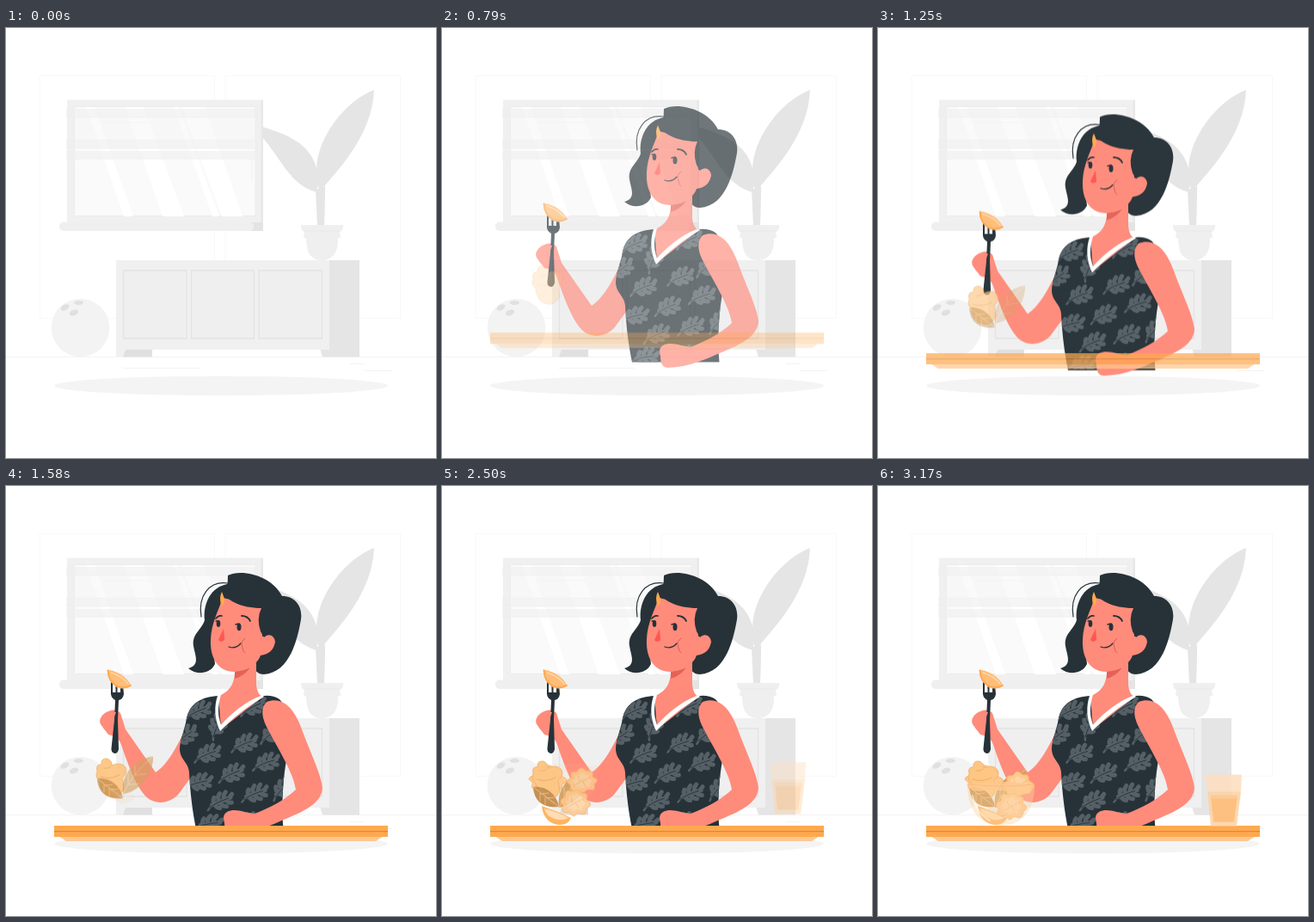
Animation, 500 px wide and 500 px high, one loop 3.21 s. Source, as an HTML page:

```html
<!DOCTYPE html>
<html lang="en">
<head>
<meta charset="utf-8">
<title>Healthy lunch</title>
<style>
html, body { margin: 0; width: 100%; height: 100%; overflow: hidden; background: #fff; }
svg { display: block; width: 100vw; height: 100vh; }
.slide { opacity: 0; }
.line { fill: none; stroke-linecap: round; stroke-linejoin: round; }
.dark { fill: #263238; }
.skin { fill: #ff8b7b; }
</style>
</head>
<body>
<svg viewBox="0 0 500 500">
  <defs>
    <clipPath id="dressClip"><use href="#dress"/></clipPath>
    <clipPath id="pane"><rect x="80" y="92" width="210" height="127"/></clipPath>
    <g id="print" class="line" stroke="#555f66">
      <path stroke-width="5" d="M-10 0H13M-7 0Q-8 -4 -5 -7M-7 0Q-7 5 -3 7M-1 0Q-2 -6 3 -9M-1 0Q0 6 5 8M5 0Q5 -5 10 -8M6 0Q8 5 12 6M11 0L16 -3"/>
      <path stroke-width="2.400" d="M-17 4Q-13 1 -8 0"/>
      <path stroke="#263238" stroke-width=".8" d="M-14 2Q-4 -1 10 0"/>
    </g>
  </defs>

  <g id="room">
    <g class="line" stroke="#f8f8f8">
      <path d="M39.500 55.500H242.500V337.500H39.500ZM255.500 55.500H458.500V337.500H255.500Z"/>
      <path stroke="#f3f3f3" d="M0 382.500H500M136 395.500H224M400 390.500H416M417 398.500H448"/>
    </g>
    <ellipse cx="250" cy="416" rx="194" ry="11.300" fill="#f4f4f4"/>

    <path fill="#f0f0f0" d="M71 83.500H299V236H71Z"/>
    <path fill="#e8e8e8" d="M296.500 84H299V236H285V226H296.500Z"/>
    <path fill="#e4e4e4" d="M286 226H299V236H286Z"/>
    <path fill="#fafafa" stroke="#ececec" d="M79.500 91.500H290V218.500H79.500Z"/>
    <g clip-path="url(#pane)" fill="#fff">
      <path d="M93 92H103L148 219H137ZM138 92H160L207 219H182ZM195 92H201L248 219H240ZM204 92H231L275 219H251Z"/>
    </g>
    <g fill="#f0f0f0" fill-opacity=".65">
      <path d="M70 94H293V104H70ZM70 130H293V140H70ZM70 143H293V153H70Z"/>
      <path fill-opacity=".35" d="M80 104H290V129H80Z"/>
    </g>
    <path class="line" stroke="#ededed" stroke-width=".6" d="M70 104H293M70 130H293M70 140H293M114 110H167M286 152V177"/>
    <rect x="62" y="225.500" width="226" height="10.500" rx="5" fill="#efefef"/>

    <g fill="#e5e5e5">
      <path d="M360 188Q361 210 362 230H370Q371 205 371 184Z"/>
      <path d="M298 115C325 123 354 134 361 163C363 174 363 184 361 191C330 182 320 152 298 127Z"/>
      <path d="M428 72C394 85 361 128 361 166Q360 180 365 190C386 165 426 125 428 72Z"/>
    </g>
    <path fill="#efefef" d="M343 229H392V233Q391 236 388 237L389 244H386C387 260 380 270 367 270S349 260 349 244H346L347 237Q343 236 343 229Z"/>
    <path class="line" stroke="#e6e6e6" stroke-width=".8" d="M347 236H388"/>

    <path fill="#f0f0f0" d="M128 270H376V382H368L365 374H170V382H128Z"/>
    <path fill="#e5e5e5" d="M376 270H411V382.500H368L366 374H376Z"/>
    <path fill="#e0e0e0" d="M139 374H170V382.500H136Z"/>
    <path fill="#efefef" stroke="#e3e3e3" stroke-width="1.300" d="M136.500 282H210V361H136.500ZM215.500 282H288.500V361H215.500ZM294 282H367.500V361H294Z"/>

    <circle cx="86.500" cy="348.500" r="33.800" fill="#f3f3f3"/>
    <g fill="#e0e0e0">
      <ellipse cx="68.500" cy="325" rx="5.300" ry="3.200" transform="rotate(-30 68.500 325)"/>
      <ellipse cx="84.500" cy="319.500" rx="5.500" ry="2.600"/>
      <ellipse cx="79" cy="331" rx="5.400" ry="3.200" transform="rotate(-22 79 331)"/>
    </g>
  </g>

  <g id="woman" class="slide">
    <path class="dark" d="M258 104C274 96 309 104 321 128C337 128 345 141 343 155C339 178 330 217 300 219Q289 219 286 205L257 130Z"/>
    <path class="dark" d="M258 114C238 117 229 137 231 156C227 168 216 172 218 186C220 198 226 208 212 212C222 221 238 218 243 207L241 190L247 150L264 130Z"/>
    <path class="line" stroke="#263238" stroke-width="1.200" d="M227 152C223 128 236 110 258 113"/>

    <path class="skin" d="M210 279C200 302 187 325 174 333L139 283L133 264Q126 257 115 264Q107 270 110 277L119 289Q129 291 133 298C141 322 150 346 160 358C171 372 189 370 200 359L217 336Z"/>
    <path class="skin" d="M266 208C267 229 262 238 246 245L250 284L298 245Q292 242 291 231V202Z"/>
    <path fill="#e56158" d="M266 215Q275 216 284 211Q277 221 266 224Z"/>
    <path id="dress" class="dark" d="M247 244C228 245 214 252 210 270C208 284 202 294 202 307C203 319 212 321 213 333C214 355 217 380 221 398.500H322.500C320 372 322 345 325 325C330 305 329 257 318 248Q310 243 300 244L250 283Z"/>
    <g id="prints" clip-path="url(#dressClip)"></g>
    <path fill="#fff" d="M246 244L250 243C246 256 246 267 250 278C262 264 278 251 296 244L300 245C281 256 264 269 249 285C242 270 242 256 246 244Z"/>

    <path class="skin" d="M252 130C247 145 239 159 238 178C237 198 245 216 266 216C281 214 292 208 296 197Q311 195 313 181Q311 171 302 174L298 175L297 140Z"/>
    <path class="dark" d="M250 119C254 133 274 142 297 142Q291 154 296 169L300 176Q308 169 313 175L322 145L305 115L270 105Z"/>
    <path fill="#ffa94d" d="M251 123Q247 131 251 140Q255 136 254 131Z"/>
    <ellipse class="dark" cx="247" cy="160" rx="2.300" ry="4"/>
    <ellipse class="dark" cx="271" cy="164" rx="2.500" ry="4.200"/>
    <path class="line" stroke="#263238" stroke-width="1.800" d="M244 154Q247 150 251 151M274 151Q281 151 284 157"/>
    <path class="line" stroke="#263238" stroke-width="1.300" d="M244 157L246 157M267 161L271 160M259 187Q267 190 273 183"/>
    <path fill="#ff5652" d="M253 166L247 179Q250 183 254 179Z"/>
    <path class="line" stroke="#d9574f" stroke-width=".9" d="M278 177Q272 181 275 188Q275 192 278 194"/>

    <path class="skin" d="M303 251C324 243 337 263 344 283C352 306 366 333 368 351C367 368 349 377 328 386C306 395 289 404 263 405Q254 405 254 392Q251 382 257 379C267 374 277 380 289 381C308 374 327 363 337 353C334 332 314 302 302 278Q294 260 303 251Z"/>

    <path class="dark" d="M122 228L124 229V240H127.500V230H129.500V240H133V230L136 231L137 242Q136 248 131 249L130 272L131 306Q130 311 126.500 311Q122 310 122.500 305L126 272L127 249Q121 246 122 238Z"/>
    <path fill="#ffbd78" d="M118 213.500Q138 217 145.500 232Q138 238 129 234Q118 228 118 213.500Z"/>
    <path class="line" stroke="#ffa64d" stroke-width="1.800" d="M118.500 214.500Q119 227 129 232.500Q138 236 145 232"/>
    <path class="line" stroke="#ffe0bb" stroke-width="1.200" d="M122 217Q135 221 142 230"/>
    <path class="skin" d="M111 270Q117 261 128 263L122 278L118 286Q109 280 111 270Z"/>
  </g>

  <g id="table" class="slide">
    <path fill="#ffc78e" d="M61 407H439L430 413H70Z"/>
    <path fill="#ffa94f" d="M56 395H444V408H56Z"/>
    <path fill="#d98a3c" d="M56 401H444V402.300H56Z"/>
  </g>

  <g id="cabbage" class="slide"></g>
  <g id="mushroom" class="slide">
    <path fill="#fdc684" stroke="#f0ad64" stroke-width=".8" d="M106 335Q104 326 111 327Q110 319 118 320Q124 323 123 328Q133 323 139 330Q142 338 135 342L137 355Q131 368 119 363Q110 360 109 346Q103 342 106 335Z"/>
    <path class="line" stroke="#f0ad64" d="M110 341Q121 345 132 339M122 329Q119 332 114 331"/>
  </g>
  <g id="leafA" class="slide">
    <path fill="#c48f50" d="M106 350C119 348 133 357 136 373C120 375 107 368 106 350Z"/>
    <path class="line" stroke="#f2c68f" stroke-width=".8" d="M106 350L136 373M114 357V366M120 362V371M115 358L124 357M122 363L131 362"/>
  </g>
  <g id="leafB" class="slide">
    <path fill="#d3a264" d="M136 374C133 353 147 334 171 330C172 350 156 371 136 374Z"/>
    <path class="line" stroke="#f5cc99" stroke-width=".8" d="M136 374Q146 351 171 330M142 362V350M150 351V341M142 363L155 362M150 352L163 350"/>
  </g>
  <g id="lemon" class="slide">
    <path fill="#ffb461" d="M116 372Q134 378 150 386Q146 395 135 394Q118 391 116 372Z"/>
    <path fill="#ffdcb2" d="M119 375Q135 379 147 386Q139 390 131 387Q121 384 119 375Z"/>
  </g>
  <g id="lower" class="slide"></g>
  <g id="right" class="slide"></g>

  <g id="bowl" class="slide">
    <path fill="#fbd3a5" fill-opacity=".42" d="M104 347H182C183 374 169 395 143 395S103 374 104 347Z"/>
    <path fill="#ffc98f" fill-opacity=".8" d="M104 347Q143 341 182 347Q180 358 167 359Q143 351 118 355Q107 355 104 347Z"/>
    <path class="line" stroke="#fff" stroke-opacity=".5" stroke-width="2" d="M110 360Q115 381 130 389"/>
    <path class="line" stroke="#f5b876" stroke-width=".8" d="M104 347Q143 351 182 347"/>
  </g>

  <g id="glass" class="slide">
    <path fill="#fddfc0" fill-opacity=".9" d="M381 336H423L422 356H383Z"/>
    <path fill="#fcd3a6" fill-opacity=".9" d="M383 356H422L417 396H387Z"/>
    <path fill="#fdbf7e" d="M387 360H418L414 391H390Z"/>
    <path fill="#fdca93" d="M387 360H418L417.500 364H387.500Z"/>
  </g>
</svg>
<script>
const LOOP = 3210;
const $ = id => document.getElementById(id);

// Closed outline with n soft ruffles around an ellipse
function ruffle(cx, cy, rx, ry, n, phase) {
  let d = '';
  for (let i = 0; i <= 120; i++) {
    const a = i / 120 * Math.PI * 2;
    const k = 1 + 0.1 * Math.sin(n * a + phase) + 0.05 * Math.sin(3 * a);
    d += (i ? 'L' : 'M') + (cx + rx * k * Math.cos(a)).toFixed(1) + ' ' + (cy + ry * k * Math.sin(a)).toFixed(1);
  }
  return d + 'Z';
}

function lettuce(id, cx, cy, rx, ry, n, phase) {
  $(id).innerHTML =
    `<path fill="#ffc88c" stroke="#f8b168" stroke-width="1" d="${ruffle(cx, cy, rx, ry, n, phase)}"/>` +
    `<path fill="#ffd5a6" d="${ruffle(cx, cy, rx * .65, ry * .65, n, phase)}"/>` +
    `<path class="line" stroke="#f6b570" stroke-width=".8" d="M${cx - rx * .6} ${cy + ry * .4}Q${cx} ${cy} ${cx + rx * .6} ${cy - ry * .3}M${cx} ${cy}l4 6M${cx - 3} ${cy}l-2 -6"/>`;
}
lettuce('cabbage', 123, 341, 20, 14, 8, 1);
lettuce('right', 163, 347, 16, 13, 8, 2);
lettuce('lower', 155, 372, 16, 15, 8, .5);

// x, y, angle of each printed leaf
const prints = [
  [223, 262, -22], [246, 279, -60], [287, 257, -25], [234, 312, -20], [277, 300, -20],
  [309, 288, -30], [224, 345, -12], [262, 335, -22], [302, 322, -18], [249, 367, -22],
  [289, 358, -20], [236, 393, -8], [322, 352, -40], [208, 291, -35], [280, 391, -15]
];
$('prints').innerHTML = prints.map(([x, y, a]) =>
  `<use href="#print" transform="translate(${x} ${y}) rotate(${a})"/>`).join('');

// id, start ms, end ms, drop height, easing
const slides = [
  ['woman', 250, 1370, 30, 'ease-out'],
  ['table', 420, 1575, 60, 'linear'],
  ['mushroom', 460, 1640, 60, 'linear'],
  ['leafA', 800, 1800, 45, 'linear'],
  ['leafB', 930, 1930, 45, 'linear'],
  ['cabbage', 1580, 2250, 20, 'linear'],
  ['right', 1680, 2650, 28, 'linear'],
  ['lower', 1600, 2650, 28, 'linear'],
  ['lemon', 1480, 2500, 28, 'linear'],
  ['bowl', 2400, 3170, 24, 'linear'],
  ['glass', 1780, 3190, 30, 'linear']
];
for (const [id, start, end, drop, easing] of slides) {
  const above = { opacity: 0, transform: `translateY(${-drop}px)` };
  const home = { opacity: 1, transform: 'translateY(0px)' };
  const anim = $(id).animate([
    { ...above, offset: 0 },
    { ...above, offset: start / LOOP, easing },
    { ...home, offset: end / LOOP },
    { ...home, offset: 1 }
  ], { duration: LOOP, iterations: Infinity });
  anim.startTime = 0;
}
</script>
</body>
</html>
```
